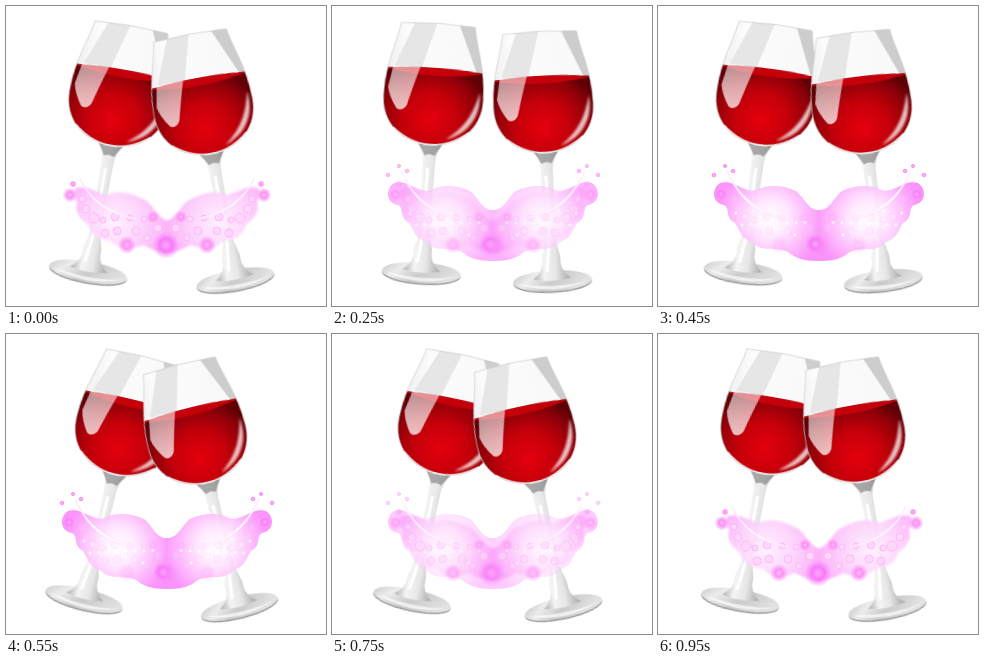
These frames come from a looping animation (320x300 px, 1 s). An HTML page without scripts:

```html
<!DOCTYPE html>
<html lang="en">
<head>
<meta charset="utf-8">
<title>Clinking wine glasses</title>
<style>
html, body { margin: 0; width: 100%; height: 100%; overflow: hidden; background: #fff; }
svg { display: block; width: 100vw; height: 100vh; }
.left { animation: left 1s infinite; }
.right { animation: right 1s infinite; }
.bubbles { animation: bubbles 1s infinite; }
.spray { animation: spray 1s infinite; }
@keyframes left {
  0% { transform: rotate(10deg); animation-timing-function: steps(7); }
  35% { transform: rotate(1.5deg); animation-timing-function: steps(4); }
  55% { transform: rotate(13.5deg); animation-timing-function: steps(8); }
  95%, 100% { transform: rotate(10deg); }
}
@keyframes right {
  0% { transform: rotate(-10.5deg); animation-timing-function: steps(7); }
  35% { transform: rotate(0deg); animation-timing-function: steps(4); }
  55% { transform: rotate(-14deg); animation-timing-function: steps(8); }
  95%, 100% { transform: rotate(-10.5deg); }
}
@keyframes bubbles {
  0% { opacity: 1; animation-timing-function: steps(7); }
  35%, 55% { opacity: .25; animation-timing-function: steps(8); }
  95%, 100% { opacity: 1; }
}
@keyframes spray {
  0% { opacity: 0; animation-timing-function: steps(7); }
  35%, 55% { opacity: 1; animation-timing-function: steps(8); }
  95%, 100% { opacity: 0; }
}
</style>
</head>
<body>
<svg viewBox="0 0 320 300">
<defs>
  <radialGradient id="wine" gradientUnits="userSpaceOnUse" cx="-2" cy="-86" r="60">
    <stop offset="0" stop-color="#e4000c"/>
    <stop offset=".45" stop-color="#c4000a"/>
    <stop offset=".8" stop-color="#8e0008"/>
    <stop offset="1" stop-color="#5e0006"/>
  </radialGradient>
  <linearGradient id="clear">
    <stop offset="0" stop-color="#eee"/>
    <stop offset=".2" stop-color="#fcfcfc"/>
    <stop offset="1" stop-color="#f8f8f8"/>
  </linearGradient>
  <linearGradient id="stem">
    <stop offset="0" stop-color="#aaa"/>
    <stop offset=".3" stop-color="#f4f4f4"/>
    <stop offset=".6" stop-color="#e6e6e6"/>
    <stop offset="1" stop-color="#a4a4a4"/>
  </linearGradient>
  <linearGradient id="foot" x2="1" y2=".3">
    <stop offset="0" stop-color="#c4c4c4"/>
    <stop offset=".3" stop-color="#ececec"/>
    <stop offset=".6" stop-color="#cacaca"/>
    <stop offset="1" stop-color="#e2e2e2"/>
  </linearGradient>
  <linearGradient id="shine" x2="0" y2="1">
    <stop offset="0" stop-color="#fff" stop-opacity=".55"/>
    <stop offset="1" stop-color="#fff" stop-opacity=".75"/>
  </linearGradient>
  <radialGradient id="ball">
    <stop offset="0" stop-color="#ffb4fa"/>
    <stop offset=".45" stop-color="#fb84f4"/>
    <stop offset="1" stop-color="#ff9cf6" stop-opacity=".25"/>
  </radialGradient>
  <radialGradient id="core">
    <stop offset="0" stop-color="#ff9cff"/>
    <stop offset=".5" stop-color="#f768f8"/>
    <stop offset="1" stop-color="#fb90fb" stop-opacity=".2"/>
  </radialGradient>
  <radialGradient id="foam" gradientUnits="userSpaceOnUse" cx="108" cy="216" r="55">
    <stop offset="0" stop-color="#fff0ff"/>
    <stop offset=".5" stop-color="#fdd0fc"/>
    <stop offset="1" stop-color="#fca6f8"/>
  </radialGradient>
  <radialGradient id="glow" gradientUnits="userSpaceOnUse" cx="112" cy="213" r="54">
    <stop offset="0" stop-color="#fff"/>
    <stop offset=".35" stop-color="#ffe6ff"/>
    <stop offset=".7" stop-color="#fdb0fc"/>
    <stop offset="1" stop-color="#fa84fa"/>
  </radialGradient>
  <filter id="soft" x="-30%" y="-30%" width="160%" height="160%"><feGaussianBlur stdDeviation="1"/></filter>
  <path id="bowl" d="M-37-181C-40-160-50-140-50-108C-50-79-28-61 0-61S50-79 50-108C50-140 40-160 37-181Q0-184-37-181Z"/>
  <clipPath id="inside"><use href="#bowl"/></clipPath>

  <g id="glass">
    <ellipse cy="69" rx="39.5" ry="10.5" fill="#9c9c9c"/>
    <ellipse cy="67.5" rx="39.5" ry="10.5" fill="url(#foot)"/>
    <path d="M-35 69Q0 83 35 69Q8 76-35 69Z" fill="#fff" opacity=".7"/>
    <path d="M-13-62C-7-54-6-49-6-40L-5 20C-5 34-10 40-9 48C-9 56-14 62-19 65Q0 70 19 65C14 62 9 56 9 48C10 40 5 34 5 20L6-40C6-49 7-54 13-62Z" fill="url(#stem)"/>
    <path d="M-1-38V25Q-3 44-5 58" fill="none" stroke="#fff" stroke-width="3"/>
    <path d="M-12-62Q0-58 12-62Q8-56 5-50Q0-53-5-50Q-8-56-12-62Z" fill="#777" opacity=".6"/>
    <use href="#bowl" fill="url(#clear)"/>
    <g clip-path="url(#inside)">
      <path d="M-23-183H-1L-15-132H-43Z" fill="#e6e6e6"/>
      <path d="M21-183H38L52-130H44Z" fill="#cdcdcd"/>
      <path d="M-52-135Q0-141 52-135V-60H-52Z" fill="url(#wine)"/>
      <path d="M-50-135Q0-141 50-135Q0-125-50-135Z" fill="#c6000a"/>
      <path d="M-42-138H-15Q-22-115-26-99Q-30-92-36-95Q-44-106-46-116Z" fill="url(#shine)"/>
      <path d="M46-116C49-90 35-73 15-67C34-81 41-95 46-116Z" fill="#fff" opacity=".75" filter="url(#soft)"/>
    </g>
    <use href="#bowl" fill="none" stroke="#ccc" stroke-width=".7"/>
    <path d="M-38-76Q-20-61 0-61T38-76" fill="none" stroke="#eee" stroke-width="1.5"/>
  </g>

  <path id="foamHalf" fill="url(#foam)" d="M162 215C151 212 147 197 137 193C124 186 111 184 101 189C90 186 80 179 70 182Q66 188 71 196C68 206 74 213 82 219C85 230 94 234 105 235C115 246 130 242 137 239Q149 246 162 247Z"/>
  <g id="bubbleHalf">
    <g fill="url(#ball)">
      <circle cx="64" cy="189" r="7"/><circle cx="67" cy="178" r="3.5"/>
      <circle cx="121" cy="239" r="8.5"/><circle cx="147" cy="211" r="6"/>
    </g>
    <g fill="#ffd2fc" stroke="#fca8f6" stroke-width=".8">
      <circle cx="88" cy="212" r="5"/><circle cx="99" cy="227" r="4"/>
      <circle cx="130" cy="225" r="4"/><circle cx="152" cy="222" r="4"/>
      <circle cx="80" cy="203" r="4"/><circle cx="97" cy="214" r="3"/>
      <circle cx="109" cy="211" r="4"/><circle cx="111" cy="225" r="4"/>
      <circle cx="124" cy="212" r="3"/><circle cx="138" cy="213" r="3"/>
      <circle cx="76" cy="193" r="3"/><circle cx="141" cy="232" r="3"/>
    </g>
    <path d="M74 172C82 190 99 205 130 213C103 209 83 195 74 172Z" fill="#fff" stroke="#ffe4ff"/>
  </g>
  <g id="sprayHalf">
    <path d="M162 204C150 205 147 192 138 185C124 178 107 179 99 184C85 188 77 173 62 177C53 183 54 197 66 199C73 203 66 211 77 217C82 224 82 232 94 236C103 247 117 240 130 246Q141 256 162 255Z" fill="url(#glow)"/>
    <path d="M69 165C78 184 94 206 135 214C101 212 81 194 69 165Z" fill="#fff" stroke="#ffe5ff"/>
    <g fill="#ff9bf7" stroke="#f070ec" stroke-width=".8">
      <circle cx="56" cy="169" r="1.8"/><circle cx="67" cy="160" r="1.6"/>
      <circle cx="75" cy="165" r="1.8"/>
    </g>
    <circle cx="63" cy="188" r="6" fill="url(#core)"/>
    <path d="M78 207L145 232M84 219L150 216M96 205L122 229" stroke="#fff" stroke-width="3" stroke-linecap="round" stroke-dasharray="0 9" opacity=".85"/>
  </g>
</defs>

<rect width="320" height="300" fill="#fff"/>
<g transform="translate(94 199.5)"><use class="left" href="#glass"/></g>
<g transform="translate(217 207.5)"><use class="right" href="#glass"/></g>

<g opacity=".88">
  <g filter="url(#soft)">
    <use href="#foamHalf"/>
    <use href="#foamHalf" transform="translate(322) scale(-1 1)"/>
  </g>
  <g class="spray">
    <use href="#sprayHalf"/>
    <use href="#sprayHalf" transform="translate(322) scale(-1 1)"/>
    <circle cx="157" cy="238" r="10" fill="url(#core)"/>
  </g>
  <g class="bubbles">
    <use href="#bubbleHalf"/>
    <use href="#bubbleHalf" transform="translate(322) scale(-1 1)"/>
    <circle cx="160" cy="239" r="13" fill="url(#core)"/>
  </g>
</g>
</svg>
</body>
</html>
```
